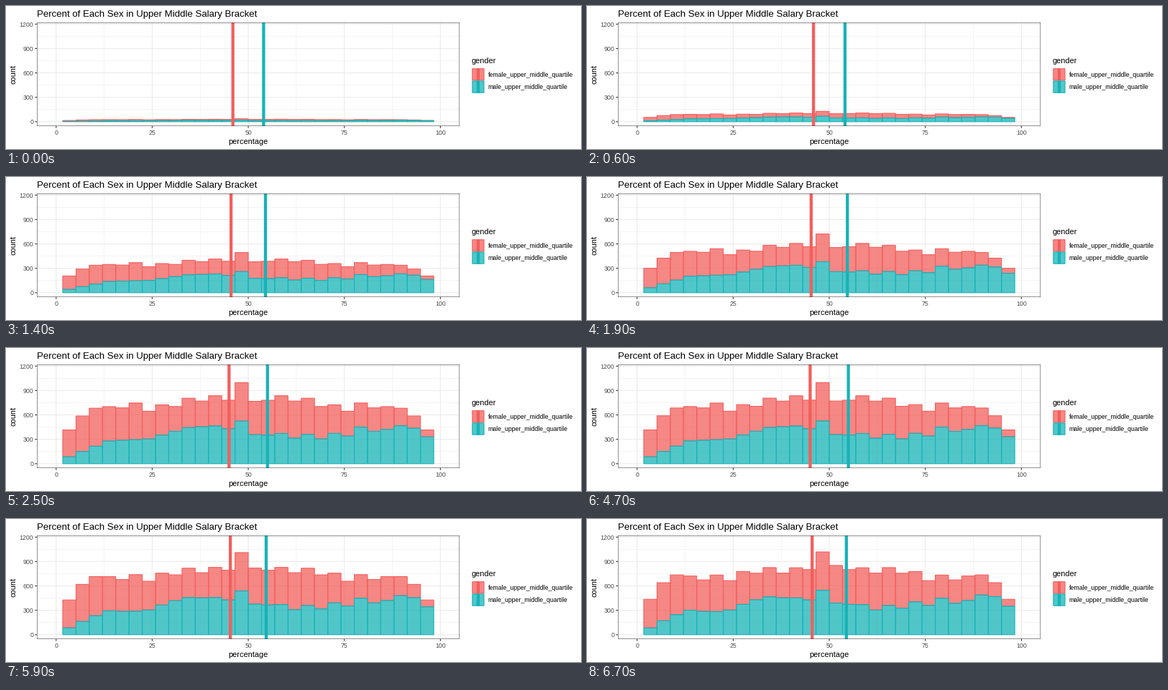
Recreate the animation shown at these times as a matplotlib script. Size 800x200 px, loop 8 s.

```python
import numpy as np
import matplotlib.pyplot as plt
from matplotlib.animation import FuncAnimation
from matplotlib.patches import Rectangle

plt.rcParams["font.family"] = "Liberation Sans"

W, H, DPI = 800, 200, 100
PX = 72 / DPI                       # points per pixel
LEFT, RIGHT, TOP, BOTTOM = 43, 631.1, 23, 168
RED, TEAL, ALPHA = "#F25F5C", "#17B3B7", 0.75
THIN, LINE, THICK = 0.53, 1.07, 4.27
BINS, BIN = 28, 100 / 29
STEP, FRAMES = 100, 80
RISE, SHIFT, STEPS = 500, 4700, 21  # start of each move, steps in a move


def male_counts():
    """Outline through key points, a zigzag on the right and a central peak."""
    k = np.arange(BINS)
    outline = np.interp(
        k, [0, 3, 6, 9, 11, 14, 19, 21, 22, 24, 25.5, 27],
        [85, 280, 305, 445, 465, 357, 330, 365, 425, 422, 490, 330])
    zigzag = np.where((k > 15) & (k < 24), 25 * (-1.0) ** k, 0)
    return outline + zigzag + 132 * (k == 13)


def yearly_change():
    return 10 + 22 * np.cos(2 * np.pi * (np.arange(BINS) - 2) / 6)


def female_counts(male, even):
    """Shares add up to 100, so mirror the male bins; 50 falls in bin 13."""
    female = male[::-1].copy()
    female[13] += even
    female[14] -= even
    return female


def sx(v):
    return LEFT + (RIGHT - LEFT) * (v + 5) / 110


def sy(v):
    return 161.8 - 0.1137 * v


fig = plt.figure(figsize=(W / DPI, H / DPI), dpi=DPI, facecolor="white")
ax = fig.add_axes([0, 0, 1, 1])
ax.set_xlim(0, W)
ax.set_ylim(H, 0)
ax.axis("off")


def line(x, y, color, width, z=1):
    return ax.plot(x, y, color=color, lw=width * PX, zorder=z, snap=False,
                   solid_capstyle="butt")[0]


def rect(x, y, w, h, z, **kw):
    return ax.add_patch(Rectangle((x, y), w, h, zorder=z, snap=False, **kw))


def box(x, y, w, h, color, z):
    return (rect(x, y, w, h, z, fc=color, ec="none", alpha=ALPHA),
            rect(x, y, w, h, z, fc="none", ec=color, lw=LINE * PX))


def text(x, y, s, size, color="black", **kw):
    ax.text(x, y, s, fontsize=size * PX, color=color, va="baseline", **kw)


def draw_axes():
    for v in np.arange(0, 101, 12.5):
        line([sx(v)] * 2, [TOP, BOTTOM], "#EBEBEB", THIN if v % 25 else LINE)
    for v in range(0, 1201, 150):
        line([LEFT, RIGHT], [sy(v)] * 2, "#EBEBEB", THIN if v % 300 else LINE)
    for v in range(0, 101, 25):
        line([sx(v)] * 2, [BOTTOM, BOTTOM + 2.75], "#333333", LINE)
        text(sx(v), 180, str(v), 8.8, "#4D4D4D", ha="center")
    for v in range(0, 1201, 300):
        line([LEFT - 2.75, LEFT], [sy(v)] * 2, "#333333", LINE)
        text(38, sy(v) + 3.2, str(v), 8.8, "#4D4D4D", ha="right")
    # the panel clips the outer half of its border
    half = THIN / 2
    rect(LEFT + half, TOP + half, RIGHT - LEFT - THIN, BOTTOM - TOP - THIN, 6,
         fc="none", ec="#333333", lw=THIN * PX)
    text(43, 15, "Percent of Each Sex in Upper Middle Salary Bracket", 13.2)
    text(337, 193, "percentage", 11, ha="center")
    text(13.3, 95.7, "count", 11, ha="center", rotation=90,
         rotation_mode="anchor")


def draw_legend():
    text(648, 80, "gender", 11)
    x, size = 648.3, 17.28
    for i, (name, color) in enumerate((("female", RED), ("male", TEAL))):
        y = 87.2 + i * size
        box(x + THIN, y + THIN, size - LINE, size - LINE, color, 2)
        line([x + size / 2] * 2, [y, y + size], color, THICK, 3)
        text(670.6, y + 11.9, name + "_upper_middle_quartile", 8.8)


def make_bars(color, z):
    width = sx(BIN) - sx(0)
    return [box(sx(BIN * (k + 0.5)), sy(0), width, 0, color, z)
            for k in range(BINS)]


draw_axes()
draw_legend()
base, change = male_counts(), yearly_change()
female_bars, male_bars = make_bars(RED, 3), make_bars(TEAL, 4)
female_line = line([0, 0], [TOP, BOTTOM], RED, THICK, 5)
male_line = line([0, 0], [TOP, BOTTOM], TEAL, THICK, 5)


def progress(t, start):
    return min(max((t - start + STEP) / (STEPS * STEP), 0), 1)


def set_bar(bar, low, high):
    for part in bar:
        part.set_y(sy(high))
        part.set_height(sy(low) - sy(high))


def update(i):
    rise, shift = progress(i * STEP, RISE), progress(i * STEP, SHIFT)
    scale = 0.036 + 0.964 * rise
    male = base * scale + change * shift
    female = female_counts(male, 115 * scale - 32 * shift)
    for k in range(BINS):
        set_bar(male_bars[k], 0, male[k])
        set_bar(female_bars[k], male[k], male[k] + female[k])
    mean = 46 - rise + 0.55 * shift
    female_line.set_xdata([sx(mean)] * 2)
    male_line.set_xdata([sx(100 - mean)] * 2)
    return []


anim = FuncAnimation(fig, update, frames=FRAMES, interval=STEP,
                     init_func=lambda: update(0), repeat=True, repeat_delay=0)
plt.show()
```
